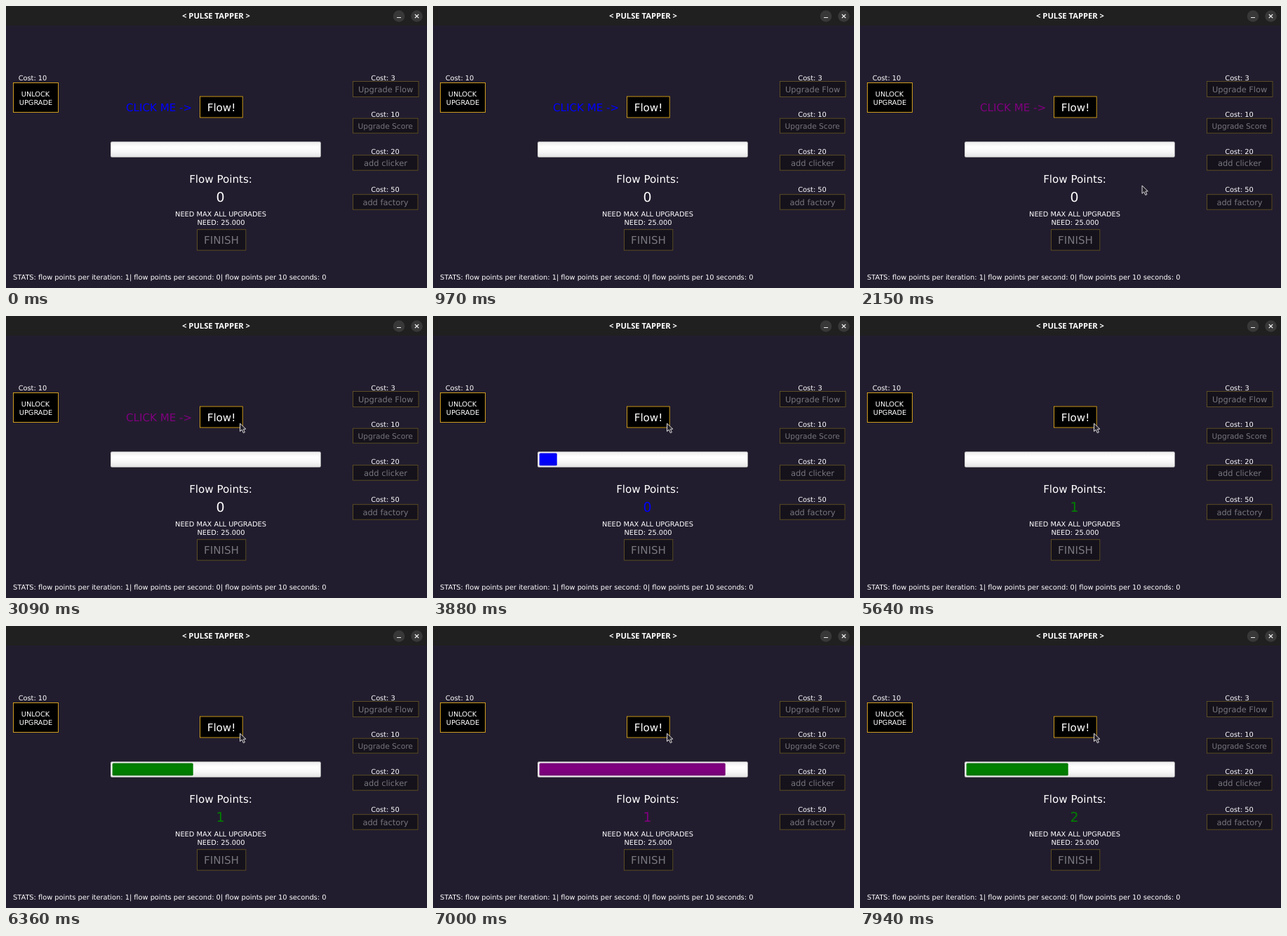
Animation, 600 px wide and 402 px high, one loop 8 s. Source, as an HTML page with a canvas:

```html
<!DOCTYPE html>
<html lang="en">
<head>
<meta charset="utf-8">
<title>Pulse Tapper</title>
<style>
  html, body { margin: 0; width: 100%; height: 100%; overflow: hidden; background: #221d2e; }
  canvas { display: block; width: 600px; height: 402px; }
</style>
</head>
<body>
<canvas id="stage" width="600" height="402"></canvas>
<script>
const canvas = document.getElementById('stage');
const ratio = window.devicePixelRatio || 1;
canvas.width = 600 * ratio;
canvas.height = 402 * ratio;
const ctx = canvas.getContext('2d');
ctx.scale(ratio, ratio);

const LOOP = 8000;
const START = 3640;
const SANS = '"DejaVu Sans", Verdana, sans-serif';
const COLORS = ['#0000ff', '#ff0000', '#008000', '#800080'];
const SMALL = 9.8, MEDIUM = 11.4, LARGE = 15.1;

// [progress tick, time in ms]
const TICKS = [
  [0, START], [6, 4640], [7, 4850], [11, 5640], [12, 5760], [13, 5940],
  [19, 6820], [20, 7000], [21, 7150], [27, 7940], [28, 8080]
];

function text(str, x, y, size, color = '#fff', align = 'center', font = SANS, weight = 'normal') {
  ctx.save();
  // The tiny skew turns off glyph hinting, so small text keeps its true height.
  ctx.transform(1, 0.0002, 0, 1, x, y);
  ctx.font = `${weight} ${size}px ${font}`;
  ctx.textRendering = 'geometricPrecision';
  ctx.fillStyle = color;
  ctx.textAlign = align;
  ctx.fillText(str, 0, 0);
  ctx.restore();
}

function box(x, y, w, h, fill, stroke) {
  ctx.fillStyle = fill;
  ctx.fillRect(x, y, w, h);
  ctx.strokeStyle = stroke;
  ctx.lineWidth = 0.9;
  ctx.strokeRect(x + 0.5, y + 0.5, w - 1, h - 1);
}

function button(x, y, w, h) {
  box(x, y, w, h, '#000', '#e3ac22');
}

function disabled(label, x, y, w, h, size, tx, ty) {
  box(x, y, w, h, '#15121c', '#625325');
  text(label, tx, ty, size, '#77757c');
}

function rounded(x, y, w, h, r, fill) {
  ctx.beginPath();
  ctx.roundRect(x, y, w, h, r);
  ctx.fillStyle = fill;
  ctx.fill();
}

function line(points, color, width) {
  ctx.beginPath();
  for (const [x1, y1, x2, y2] of points) {
    ctx.moveTo(x1, y1);
    ctx.lineTo(x2, y2);
  }
  ctx.strokeStyle = color;
  ctx.lineWidth = width;
  ctx.stroke();
}

function titleBar() {
  ctx.fillStyle = '#202020';
  ctx.fillRect(0, 0, 600, 28);
  text('< PULSE TAPPER >', 299.5, 18.4, 11.2, '#fff', 'center', '"Noto Sans", "Open Sans", sans-serif', 'bold');
  for (const x of [560, 585.5]) {
    ctx.beginPath();
    ctx.arc(x, 14.5, 8.3, 0, 7);
    ctx.fillStyle = '#383838';
    ctx.fill();
  }
  line([[557, 16.5, 563, 16.5]], '#eee', 1);
  line([[582.8, 11.8, 588.2, 17.2], [588.2, 11.8, 582.8, 17.2]], '#fff', 1.2);
}

function panels() {
  text('Cost: 10', 38, 106, SMALL);
  button(10, 109, 65, 43);
  text('UNLOCK', 42, 129.2, SMALL);
  text('UPGRADE', 42.5, 141.2, SMALL);

  text('Cost: 3', 537.5, 106, SMALL);
  disabled('Upgrade Flow', 494, 107, 94.5, 23, MEDIUM, 541.1, 123);
  text('Cost: 10', 540.5, 158, SMALL);
  disabled('Upgrade Score', 494, 159.7, 93.5, 22, 10.6, 540.6, 174.8);
  text('Cost: 20', 540.5, 210.6, SMALL);
  disabled('add clicker', 494, 212.2, 93.5, 22.5, MEDIUM, 541, 227.7);
  text('Cost: 50', 540.5, 265.4, SMALL);
  disabled('add factory', 494, 268.2, 93.5, 22.5, MEDIUM, 541, 283.7);

  button(276, 128.5, 61.7, 31);
  text('Flow!', 307, 150, LARGE);
  text('Flow Points:', 306, 252, LARGE);
  text('NEED MAX ALL UPGRADES', 306, 300.3, SMALL);
  text('NEED: 25.000', 306.5, 312.4, SMALL);
  disabled('FINISH', 272, 318.2, 70.3, 30.5, LARGE, 307, 339.3);
  text('STATS: flow points per iteration: 1| flow points per second: 0| ' +
    'flow points per 10 seconds: 0', 10, 390.2, SMALL, '#fff', 'left');
}

function shaded(x, y, w, h, color) {
  const shade = ctx.createLinearGradient(0, y, 0, y + h);
  [0.07, 0, 0.03, 0.1].forEach((a, i) => shade.addColorStop(i / 3, `rgba(0,0,0,${a})`));
  rounded(x, y, w, h, 1.5, color);
  rounded(x, y, w, h, 1.5, shade);
}

function progress(part, color) {
  rounded(149, 193.2, 299.8, 22.5, 2, '#c0c0c0');
  shaded(149.8, 194, 298.2, 20.9, '#fff');
  if (part > 0) shaded(151.6, 195.6, 300 * part - 4.9, 17.7, color);
}

function tickAt(t) {
  for (let i = 1; i < TICKS.length; i++) {
    const [n0, t0] = TICKS[i - 1], [n1, t1] = TICKS[i];
    if (t < t1) return Math.floor(n0 + (n1 - n0) * (t - t0) / (t1 - t0) + 1e-6);
  }
  return 28;
}

function glide(t, t0, t1, a, b) {
  const p = Math.min(1, Math.max(0, (t - t0) / (t1 - t0)));
  const e = p * p * (3 - 2 * p);
  return [a[0] + (b[0] - a[0]) * e, a[1] + (b[1] - a[1]) * e];
}

function pointer(t) {
  if (t < 1580) return;
  const rest = [370, 206];
  const [x, y] = t < 2700
    ? glide(t, 1530, 2450, [497, 404], rest)
    : glide(t, 2660, 3090, rest, [333, 152.3]);
  ctx.save();
  ctx.translate(x, y);
  ctx.beginPath();
  ctx.moveTo(0.5, 0.8);
  ctx.lineTo(0.5, 12.2);
  ctx.lineTo(3.2, 9.8);
  ctx.lineTo(5.3, 14.4);
  ctx.lineTo(7.4, 13.4);
  ctx.lineTo(5.4, 9);
  ctx.lineTo(8.8, 8.8);
  ctx.closePath();
  ctx.fillStyle = '#26232c';
  ctx.fill();
  ctx.strokeStyle = '#e6e6e6';
  ctx.lineWidth = 0.95;
  ctx.lineJoin = 'round';
  ctx.stroke();
  ctx.restore();
}

function draw(t) {
  ctx.fillStyle = '#221d2e';
  ctx.fillRect(0, 0, 600, 402);
  titleBar();
  panels();
  if (t < START) {
    const step = Math.floor((t - 70) / 299) + 1;
    text('CLICK ME ->', 171, 149.5, LARGE, COLORS[step % 4], 'left');
    progress(0);
    text('0', 305.5, 278.7, 18.9);
  } else {
    const tick = tickAt(t);
    const color = COLORS[(tick + 3) % 4];
    progress(tick % 11 / 10, color);
    text(Math.floor(tick / 11), 305.5, 278.7, 18.9, color);
  }
  pointer(t);
}

function frame() {
  draw(performance.now() % LOOP);
  requestAnimationFrame(frame);
}
frame();
</script>
</body>
</html>
```
